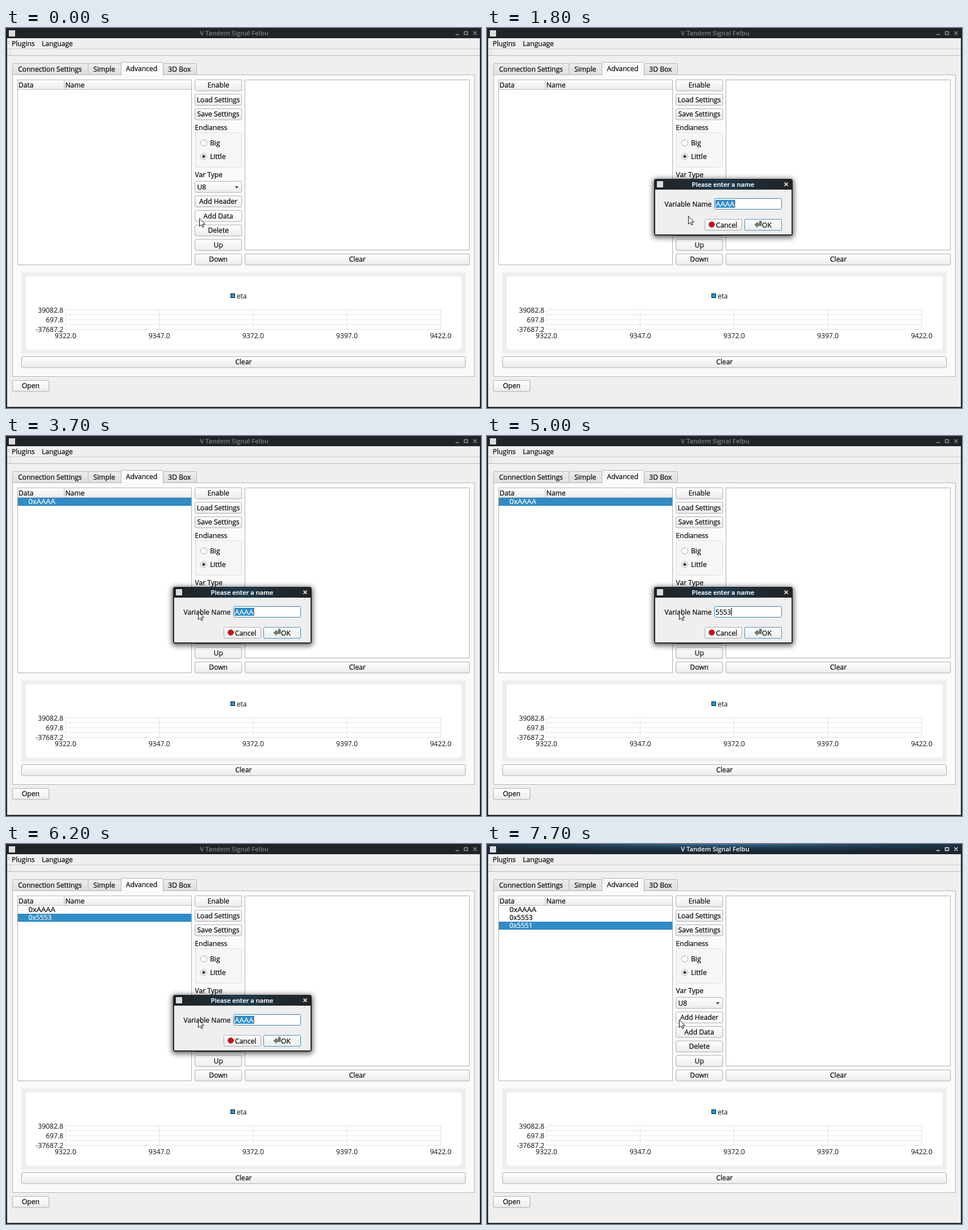
Write an HTML page that moves like this. It is 836 px wide and 670 px high and loops after 8 s.

```html
<!DOCTYPE html>
<html lang="en">
<head>
<meta charset="utf-8">
<title>Serial tool</title>
<style>
  html, body { margin: 0; width: 100%; height: 100%; overflow: hidden; background: #efefef; }
  svg { display: block; }
  text { font-family: "Open Sans", "Noto Sans", sans-serif; white-space: pre; stroke-width: .2; }
  #title { stroke: none; }
</style>
</head>
<body>
<svg id="stage" width="836" height="670" viewBox="0 0 836 670"></svg>
<script>
const LOOP = 8000, SEL = '#308cc6';

// Markup helpers
const rect = (x, y, w, h, fill, more = '') =>
  `<rect x="${x}" y="${y}" width="${w}" height="${h}" fill="${fill}" ${more}/>`;
const box = (x, y, w, h, fill, line, r = 0, more = '') =>
  rect(x + .5, y + .5, w - 1, h - 1, fill, `stroke="${line}" rx="${r}" ${more}`);
const path = (d, line, more = '') => `<path d="${d}" fill="none" stroke="${line}" ${more}/>`;
const text = (x, y, s, { anchor = 'start', fill = '#000', size = 12.1, more = '' } = {}) =>
  `<text x="${x}" y="${y}" text-anchor="${anchor}" fill="${fill}" stroke="${fill}" font-size="${size}" ${more}>${s}</text>`;
const mid = (x, y, s, o = {}) => text(x, y, s, { ...o, anchor: 'middle' });
const button = (x, y, w, label, id = '') =>
  box(x, y, w, 20.5, 'url(#btn)', '#adadad', 2, id && `id="${id}"`) + mid(x + w / 2, y + 14.4, label);
const cross = (x, y) => `M${x - 3} ${y - 3}l6 6m0-6l-6 6`;
const stops = colours => colours.map((c, i) =>
  `<stop offset="${i / (colours.length - 1)}" stop-color="${c}"/>`).join('');
const gradient = (id, colours, dir = 'x2="0" y2="1"') =>
  `<linearGradient id="${id}" ${dir}>${stops(colours)}</linearGradient>`;

const defs = '<defs>' +
  gradient('btn', ['#fefefe', '#ececec']) +
  gradient('hover', ['#ffffff', '#f7f7f7']) +
  gradient('tab', ['#ececec', '#dfdfdf']) +
  gradient('glow', ['#202427', '#1f2a31', '#1d3c4f', '#1f2a31', '#202427'], 'x2="1" y2="0"') +
  `<radialGradient id="active" cx=".5" cy="0" r=".75">${stops(['#3a6a90', '#1f3a50', '#1b2630'])}</radialGradient>` +
  '<filter id="blur" x="-20%" y="-30%" width="140%" height="160%"><feGaussianBlur stdDeviation="5"/></filter></defs>';

const frame = rect(0, 0, 836, 670, '#202427', 'id="frame"') +
  rect(0, 0, 836, 18, '#202427', 'id="bar"') +
  rect(5, 4, 11, 11, '#dcdcdc') +
  mid(401.5, 13, 'V Tandem Signal Felbu', { size: 11.2, more: 'id="title" font-weight="600"' }) +
  path('M791 11.5h6M806.5 6.5h6v5h-6z' + cross(825.5, 9), '#999', 'id="controls" stroke-width="1.3"') +
  rect(2, 18, 832, 650, '#efefef');

let dots = '';
for (let y = 38; y < 48; y += 3) dots += `M5 ${y + .5}h1m2 0h1`;
const menu = text(10, 31.5, 'Plugins') + text(63, 31.5, 'Language') +
  path('M2 36.5h832', '#cfcfcf') + path('M2 48.5h832', '#bdbdbd') + path(dots, '#bbb');

const tab = (x, w, label) => box(x, 62, w, 21, 'url(#tab)', '#b8b8b8', 2) + mid(x + w / 2 - .6, 76.5, label);
const tabs = tab(11, 134, 'Connection Settings') + tab(144, 59, 'Simple') + tab(276, 60, '3D Box') +
  box(11, 82, 814, 533, '#fafafa', '#b5b5b5') +
  box(202, 60, 75, 25, '#fafafa', '#b5b5b5', 2) + rect(203, 82, 73, 4, '#fafafa') +
  mid(238.7, 76, 'Advanced');

const tree = box(20, 91, 307, 327, '#fff', '#b2b2b2') +
  rect(21, 92, 305, 16, 'url(#btn)') + path('M21 108.3h305M102.5 92v16', '#bcbcbc') +
  text(22, 104.5, 'Data') + text(104.5, 104.5, 'Name') + '<g id="rows"></g>';

const radio = (y, label, on) =>
  `<circle cx="348" cy="${y}" r="5.5" fill="#fff" stroke="#a5a5a5"/>` +
  (on ? `<circle cx="348" cy="${y}" r="2.7" fill="#444"/>` : '') + text(359, y + 4.3, label);

// The middle column sits on an even pitch of 25.6
const slot = (i, label, id) => button(332.2, 90.7 + 25.6 * i, 83, label, id);
const column = slot(0, 'Enable') + slot(1, 'Load Settings') + slot(2, 'Save Settings') +
  text(332.5, 179.5, 'Endianess') + box(333, 184, 82, 62, '#f6f6f6', '#dddddd', 1) +
  radio(202.5, 'Big') + radio(226.5, 'Little', true) + text(332.5, 262.5, 'Var Type') +
  slot(7, '') + text(336.5, 284.5, 'U8') + '<path d="M402.5 279h7l-3.5 4z" fill="#555"/>' +
  slot(8, 'Add Header', 'header') + slot(9, 'Add Data', 'data') +
  slot(10, 'Delete') + slot(11, 'Up') + slot(12, 'Down');

const ink = { fill: '#35322f' };
let grid = '', labels = '';
for (let i = 0; i < 5; i++) {
  const x = 105 + 165.1 * i;
  grid += `M${x - .3} 497v35M104.5 ${496.9 + 8.6 * i}h661`;
  labels += mid(x - .3, 547, (9322 + 25 * i).toFixed(1), ink);
}
['39082.8', '697.8', '-37687.2'].forEach((s, i) =>
  labels += text(101, 501.5 + 17.3 * i, s, { ...ink, anchor: 'end' }));
const chart = rect(27, 431, 782, 143, '#eeeeee') + rect(35, 438, 767, 129, '#fff', 'rx="5"') +
  path(grid, '#e2e2e2') + labels + box(395, 468, 8, 8, '#209fdf', '#111') + text(406, 476.5, 'eta', ink);

const dialog = '<g id="dialog">' +
  rect(292, 266, 248, 104, '#000', 'rx="5" opacity=".6" filter="url(#blur)"') +
  rect(294, 266, 244, 100, '#202427', 'rx="4"') + rect(296, 267, 240, 18, 'url(#glow)') +
  rect(299, 270, 11, 11, '#dcdcdc') + rect(296, 285, 240, 79, '#efefef') +
  mid(415.5, 279.5, 'Please enter a name', { fill: '#fff', size: 11.2, more: 'font-weight="600"' }) +
  path(cross(526.5, 275.5), '#fff', 'stroke-width="1.5"') +
  text(312.5, 314.5, 'Variable Name') + box(400, 300, 119, 20, '#fff', '#3b86b4', 2) +
  '<g id="field"></g>' +
  button(383, 336.8, 66, '') + text(403, 351.5, 'Cancel') +
  '<circle cx="395.5" cy="346.5" r="5.2" fill="#d40d12" stroke="#8e8080"/>' +
  box(453, 336.8, 66, 20.5, 'url(#btn)', '#4b8fb8', 2) + text(484, 351.5, 'OK') +
  '<path d="M471 347l5-4.5v2.5h3.5v-4.5h3.5v8h-7v3z" fill="#6d8468" stroke="#47534a" stroke-width=".8"/></g>';

const pointer = '<path id="pointer" d="M.5 .8v14l3.3-3 2.2 4.7 2.2-1-2.2-4.5h4.2z" fill="#fff" stroke="#111"/>';

const stage = document.getElementById('stage');
stage.innerHTML = defs + frame + menu + tabs + tree + column +
  box(420, 91, 396, 301, '#fff', '#b2b2b2') + button(420.3, 397.9, 396, 'Clear') + chart +
  button(27, 578.8, 782, 'Clear') + button(10.7, 620.8, 65.5, 'Open') + dialog + pointer;

// Timelines: each entry holds from its time until the next
const moves = [[0, 340, 335], [100, 344, 326], [200, 350, 313], [300, 354, 305],
  [800, 354, 311], [900, 354, 320], [1000, 354, 327], [1100, 354, 331],
  [3300, 350, 325], [3400, 342, 314], [3500, 338, 309]];
const states = [[0, 'idle'], [600, 'active'], [700, 'dialog'], [2400, 'active'],
  [3700, 'dialog'], [5300, 'active'], [6200, 'dialog'], [7700, 'active']];
const typed = [[0, ''], [4500, '5'], [4700, '55'], [4800, '555'], [5000, '5553'],
  [5300, ''], [6900, '5'], [7000, '55'], [7300, '555'], [7500, '5551']];
const caret = [[0, true], [1200, false], [1800, true], [4300, false], [4500, true], [6700, false], [6900, true]];
const items = [[2400, '0xAAAA'], [5300, '0x5553'], [7700, '0x5551']];
const at = (list, t) => list.filter(e => e[0] <= t).pop();

const $ = id => document.getElementById(id);
const set = (id, name, value) => $(id).setAttribute(name, value);
const sizeOf = s => s.includes('A') ? 13 : 12.1;

function rows(t) {
  const shown = items.filter(e => e[0] <= t);
  return shown.map(([, s], i) => {
    const last = i === shown.length - 1, y = 109 + 14 * i;
    return (last ? box(20.7, y, 305.6, 14, SEL, '#2a7db2') : '') +
      text(39.5, y + 11.3, s, { fill: last ? '#fff' : '#000', size: sizeOf(s) });
  }).join('');
}

function field(t) {
  const s = at(typed, t)[1], on = at(caret, t)[1];
  const body = s ? text(402, 314.5, s)
    : rect(402, 303, 35, 14, SEL) + text(402.5, 314.7, 'AAAA', { fill: '#fff', size: 13 });
  return body + (on ? rect(s ? 402 + 7 * s.length : 436, 303, 1, 14, s ? '#000' : '#cf7339') : '');
}

let shownStep = -1;
function draw(now) {
  const t = Math.floor(now % LOOP / 100) * 100;
  if (t !== shownStep) {
    shownStep = t;
    const [, x, y] = at(moves, t), state = at(states, t)[1], active = state === 'active';
    set('pointer', 'transform', `translate(${x} ${y})`);
    set('bar', 'fill', active ? 'url(#active)' : '#202427');
    set('frame', 'fill', active ? '#1b2832' : '#202427');
    set('title', 'fill', active ? '#fff' : '#7d8082');
    set('controls', 'stroke', active ? '#f0f0f0' : '#96999b');
    set('header', 'fill', y < 317 ? 'url(#hover)' : 'url(#btn)');
    set('data', 'fill', y > 320 ? 'url(#hover)' : 'url(#btn)');
    set('dialog', 'display', state === 'dialog' ? 'inline' : 'none');
    $('rows').innerHTML = rows(t);
    $('field').innerHTML = field(t);
  }
  requestAnimationFrame(draw);
}
draw(0);
</script>
</body>
</html>
```
